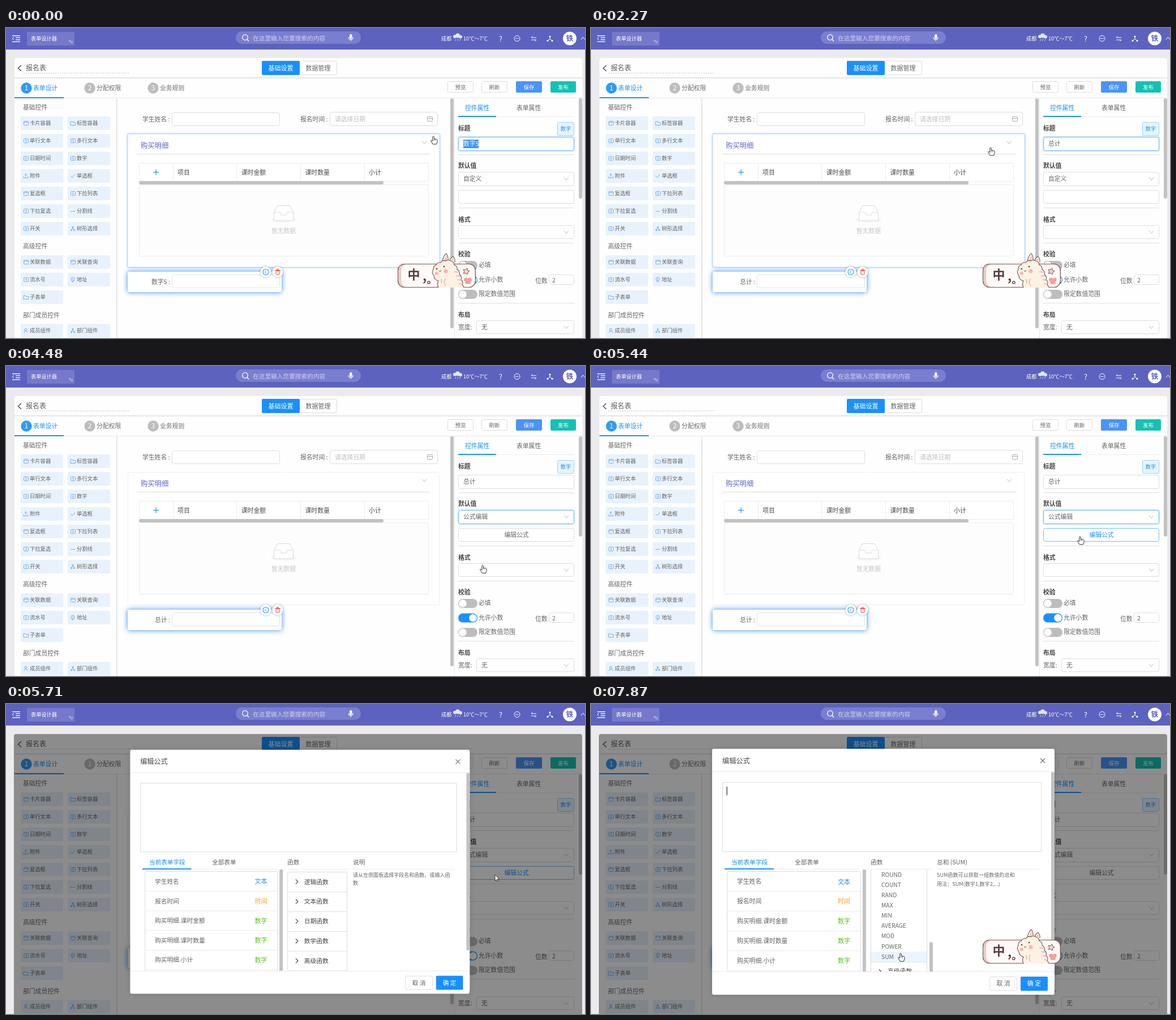
An HTML page with a canvas that plays this animation: 1023x547 px, repeating every 8000 ms.

```html
<!DOCTYPE html>
<html lang="zh">
<head>
<meta charset="utf-8">
<style>
html, body { margin: 0; width: 100%; height: 100%; overflow: hidden; background: #ebebee; }
canvas { display: block; }
</style>
</head>
<body>
<canvas id="stage" width="1023" height="547"></canvas>
<script>
const c = document.getElementById('stage').getContext('2d');
const SANS = '"Noto Sans CJK SC", "Noto Sans CJK", "Noto Sans", sans-serif';
const MONO = '"Liberation Mono", "Noto Sans CJK SC", monospace';
const BLUE = '#1890ff', INK = '#636363', LINE = '#dcdcdc', BROWN = '#755350', ICON = '#6db2f5';
const LOOP = 8000;

// ---- timeline ----
const even = (a, b, n) => Array.from({ length: n }, (_, i) => a + (b - a) * i / (n - 1));
const ticks = [0, 550, 680, 810, 940, 1190, 1440, 1710, ...even(2270, 3200, 8),
  ...even(3350, 4050, 6), ...even(4330, 5170, 7), ...even(5440, 6340, 8),
  6490, ...even(6880, 7560, 6), 7870];
const path = [[0, 755, 191], [1710, 755, 191], [2270, 706, 211], [3200, 806, 266], [3500, 806, 266],
  [4050, 838, 361], [4330, 838, 361], [5170, 862, 304], [5440, 864, 301], [5700, 864, 301],
  [6340, 547, 381], [6490, 547, 421], [6880, 547, 421], [7560, 524, 440], [7870, 547, 440]];
const typing = [[550, 'z', '在 这 中 只 做'], [680, 'zo', '走 总 作 做 左'], [810, 'zom', '总 走 宗 作 纵'],
  [940, 'zomg', '总 宗 纵 棕 综'], [1190, 'zong', '总 宗 纵 棕 综'], [1440, 'zongji', '总计 总机 总集 综计 踪迹']];

const clamp = v => Math.max(0, Math.min(1, v));
function pointer(t) {
  const i = path.findIndex(p => p[0] > t);
  if (i < 0) return path[path.length - 1].slice(1);
  const [a, b] = [path[i - 1], path[i]], k = (t - a[0]) / (b[0] - a[0]);
  return [a[1] + (b[1] - a[1]) * k, a[2] + (b[2] - a[2]) * k];
}

// ---- drawing helpers ----
function text(s, x, y, size = 11, color = INK, o = {}) {
  c.font = `${o.w || 400} ${size}px ${o.font || SANS}`;
  c.textAlign = o.align || 'left';
  c.textBaseline = 'alphabetic';
  c.fillStyle = color;
  c.fillText(s, x, y + size * .37);
}
const mid = (s, x, y, size, color, w) => text(s, x, y, size, color, { align: 'center', w });
function box(x, y, w, h, fill, stroke, r = 2) {
  c.beginPath();
  const o = stroke ? .5 : 0;
  c.roundRect(x + o, y + o, w - o * 2, h - o * 2, r);
  if (fill) { c.fillStyle = fill; c.fill(); }
  if (stroke) { c.strokeStyle = stroke; c.lineWidth = 1; c.stroke(); }
}
function line(pts, color, w = 1, close, fill) {
  c.beginPath();
  for (let i = 0; i < pts.length; i += 2) c.lineTo(pts[i], pts[i + 1]);
  if (close) c.closePath();
  if (fill) { c.fillStyle = fill; c.fill(); }
  c.strokeStyle = color; c.lineWidth = w; c.stroke();
}
const rule = (x1, x2, y, color = '#e2e2e2', h = 1) => { c.fillStyle = color; c.fillRect(x1, y, x2 - x1, h); };
function disc(x, y, r, fill, stroke, w = 1) {
  c.beginPath(); c.arc(x, y, r, 0, 7);
  if (fill) { c.fillStyle = fill; c.fill(); }
  if (stroke) { c.strokeStyle = stroke; c.lineWidth = w; c.stroke(); }
}
const chevron = (x, y, up, color = '#bbb') => {
  const d = up ? -2.5 : 2.5;
  line([x - 4, y - d, x, y + d, x + 4, y - d], color);
};
function glow(color, blur, draw) {
  c.save(); c.shadowColor = color; c.shadowBlur = blur; draw(); c.restore();
}
function clipped(x, y, w, h, draw) {
  c.save(); c.beginPath(); c.rect(x, y, w, h); c.clip(); draw(); c.restore();
}
function button(s, x, y, w, h, size, fill, stroke, color) {
  box(x, y, w, h, fill, stroke);
  mid(s, x + w / 2, y + h / 2, size, color);
}

// ---- page parts ----
function header() {
  c.fillStyle = '#5d62be'; c.fillRect(0, 0, 1023, 38);
  for (const [x, y] of [[11, 13], [17, 16.5], [17, 20], [11, 23.5]]) rule(x, 25, y, '#fff', 1.3);
  line([14, 16.5, 11, 18.7, 14, 21], '#fff');
  box(37, 7, 84, 24, '#7679ca', null, 1);
  text('表单设计器', 44, 19, 9.2, '#fff');
  box(111, 21, 3, 3, null, '#b9bbe8', 0); box(114, 23, 4, 4, null, '#b9bbe8', 0);
  box(406, 6, 221, 22, '#7a7ecf', null, 11);
  disc(422.5, 16.5, 4.8, null, '#fff', 1.3); line([426, 20, 429, 23.5], '#fff', 1.4);
  text('在这里输入您要搜索的内容', 436, 18, 10.7, '#cfd1f3');
  box(607, 11, 4.5, 8, '#fff', null, 2.2);
  c.beginPath(); c.arc(609.2, 16.5, 4, 0, Math.PI); c.strokeStyle = '#fff'; c.stroke();
  line([609.2, 20.5, 609.2, 23], '#fff');
  text('成都', 769, 18.5, 9.2, '#fff');
  for (const [x, y, r] of [[793, 15, 3], [798, 13.5, 4], [803, 15.5, 3]]) disc(x, y, r, '#dfe6f5');
  for (const x of [795, 799, 803]) line([x, 19, x - 1.5, 23], '#a9cff5');
  text('10℃～7℃', 808, 18.5, 9.2, '#fff');
  mid('?', 874, 19, 12.5, '#fff');
  disc(903, 18.5, 5, null, '#fff');
  for (const x of [901, 903, 905]) disc(x, 18.5, .8, '#fff');
  line([937, 17, 928, 17, 930.5, 14.5], '#fff'); line([928, 21, 937, 21, 934.5, 23.5], '#fff');
  line([961, 16, 961, 19, 957, 22.5], '#fff'); line([961, 19, 965, 22.5], '#fff');
  for (const [x, y] of [[961, 15], [957, 22.5], [965, 22.5]]) disc(x, y, 1.6, '#fff');
  disc(996, 18.5, 12, '#fff');
  mid('铁', 996, 18.5, 12.5, '#5d62be', 700);
  line([1016, 20.5, 1019.5, 16, 1023, 20.5], '#fff');
}

function topBars() {
  line([27, 66, 21.5, 71, 27, 76], '#444', 1.3);
  text('报名表', 35, 71, 12, '#5a5a5a');
  c.setLineDash([2, 2]); line([31, 79.5, 219, 79.5], '#c4c4c4'); c.setLineDash([]);
  button('数据管理', 518, 58, 67, 25, 11, '#fff', LINE, INK);
  button('基础设置', 452, 58, 67, 25, 11, BLUE, null, '#fff');
  rule(15, 1018, 87, '#e6e6e6', 2);
  const tabs = ['表单设计', '分配权限', '业务规则'], xs = [36, 148, 260];
  tabs.forEach((s, i) => {
    disc(xs[i], 106, 9.7, i ? '#bdbdbd' : '#2f9bf7');
    mid(i + 1, xs[i], 106, 11.5, '#fff');
    text(s, xs[i] + 12, 106, 10.8, i ? '#6a6a6a' : BLUE);
  });
  button('预览', 780, 94, 46, 20, 9.5, '#fff', LINE, INK);
  button('刷新', 840, 94, 46, 20, 9.5, '#fff', LINE, INK);
  button('保存', 901, 94, 46, 20, 9.5, '#4a93f8', null, '#fff');
  button('发布', 962, 94, 45, 20, 9.5, '#13c2b4', null, '#fff');
  rule(15, 1018, 123, '#e8e8e8');
  rule(15, 102, 122, BLUE, 2);
}

const icons = {
  card(x, y) { box(x, y - 4, 9, 8, null, ICON, 1); rule(x, x + 9, y - 2, ICON); },
  folder(x, y) { line([x, y - 3, x + 3, y - 3, x + 4, y - 1.5, x + 8.5, y - 1.5, x + 8.5, y + 3.5, x, y + 3.5], ICON, 1, true); },
  field(x, y) { box(x, y - 4, 9, 8, null, ICON, 1); mid('x', x + 4.5, y - .5, 6, '#3f9af2'); },
  check(x, y) { line([x, y, x + 3, y + 3, x + 8, y - 3], ICON); },
  dash(x, y) { rule(x, x + 8, y, ICON); },
  up(x, y) {
    line([x, y + 1, x, y + 3.5, x + 8, y + 3.5, x + 8, y + 1], ICON);
    line([x + 2, y - 1.5, x + 4, y - 4, x + 6, y - 1.5], ICON);
    line([x + 4, y - 4, x + 4, y + 1.5], ICON);
  },
  pin(x, y) { disc(x + 4, y - 1, 3.2, null, ICON); disc(x + 4, y - 1, 1, ICON); line([x + 2, y + 2, x + 4, y + 4.5, x + 6, y + 2], ICON); },
  tree(x, y) {
    box(x + 2.5, y - 4, 3, 3, null, ICON, 0);
    line([x + 1.5, y + 2, x + 4, y - 1, x + 6.5, y + 2], ICON);
    box(x, y + 1, 3, 3, null, ICON, 0); box(x + 5, y + 1, 3, 3, null, ICON, 0);
  },
  user(x, y) { disc(x + 4, y - 2, 2, null, ICON); line([x + .5, y + 4, x + 2, y + 1, x + 6, y + 1, x + 7.5, y + 4], ICON); }
};
const groups = [
  ['基础控件', 140, 167.5, '卡片容器:card 标签容器:folder 单行文本:field 多行文本:field 日期时间:field 数字:field 附件:up 单选框:check 复选框:card 下拉列表:field 下拉复选:field 分割线:dash 开关:field 树形选择:tree'],
  ['高级控件', 385, 413, '关联数据:card 关联查询:card 流水号:field 地址:pin 子表单:folder'],
  ['部门成员控件', 507, 534, '成员组件:user 部门组件:tree']];
function palette() {
  for (const [title, ty, y0, items] of groups) {
    text(title, 30, ty, 10.8, '#666');
    items.split(' ').forEach((it, i) => {
      const [s, icon] = it.split(':'), x = i % 2 ? 109 : 26, y = y0 + (i >> 1) * 31;
      box(x, Math.round(y - 12), 75, 24, '#e8f2fc', null, 1);
      icons[icon](x + 5, Math.round(y));
      text(s, x + 16, y, 9.3, INK);
    });
  }
  rule(195, 196.5, 124, '#dedede', 423);
}

function canvasArea(s) {
  text('学生姓名 :', 241, 161, 10.8);
  box(293, 149, 191, 24, '#fff', LINE, 3);
  text('报名时间 :', 520, 161, 10.8);
  box(572, 148, 191, 25, '#fff', LINE, 3);
  text('请选择日期', 581, 161, 10.8, '#bfbfbf');
  box(744, 156, 10, 9, null, '#aaa', 1); rule(744, 754, 159, '#aaa');

  if (s.hover) glow('rgba(125,180,251,.55)', 3, () => box(214, 186, 553, 237, '#fff', '#b4d3fb', 3));
  else box(215, 187, 551, 235, '#fff', '#eee', 3);
  text('购买明细', 238, 207, 12.3, '#5f64c9');
  rule(231, 750, 222, '#dadada');
  chevron(739, 202);
  box(235, 238, 512, 33, '#fff', '#ececec', 0);
  c.fillStyle = '#ececec';
  for (const x of [295, 407, 520, 633]) c.fillRect(x, 238, 1, 33);
  line([260, 254.5, 270, 254.5], BLUE, 1.2); line([265, 249.5, 265, 259.5], BLUE, 1.2);
  ['项目', '课时金额', '课时数量', '小计'].forEach((h, i) => text(h, 303 + i * 112.7, 255, 10.9, '#4a4a4a'));
  box(235, 276, 512, 127, '#fdfdfd', '#ececec', 1);
  box(235, 270, 432, 6, '#c2c2c2', null, 3);
  c.beginPath(); c.ellipse(490.5, 338, 22, 5, 0, 0, 7); c.fillStyle = '#f4f4f4'; c.fill();
  line([473.5, 325, 480, 313.5, 501, 313.5, 507.5, 325, 507.5, 340, 473.5, 340], '#d9d9d9', 1, true, '#fff');
  line([473.5, 325, 484, 325, 486, 330, 495, 330, 497, 325, 507.5, 325], '#d9d9d9');
  mid('暂无数据', 490.5, 358, 10.8, '#c6c6c6');

  glow('#2f8dfa', 9, () => box(215, 430, 272, 36, '#fff', '#a9cffb', 3));
  box(215, 430, 272, 36, '#fff', null, 3);
  text(s.title + ' :', 290, 448, 10.8, INK, { align: 'right' });
  box(293, 435, 191, 24, '#fff', '#e2e2e2', 3);
  for (const x of [459, 480]) glow('rgba(0,0,0,.3)', 4, () => disc(x, 430.5, 9.5, '#fff'));
  disc(459, 430.5, 5, null, BLUE, 1.1); mid('c', 459, 430, 7.5, BLUE);
  rule(475, 485, 427, '#f0453a', 1.2); box(476.5, 428, 7, 7.5, null, '#f0453a', 1); rule(478, 482, 425, '#f0453a', 1.2);
  box(785, 124, 6, 406, '#c2c2c2', null, 3);
}

function toggle(y, on) {
  box(799, y - 8, 34, 16, on ? BLUE : '#bdbdbd', null, 8);
  disc(on ? 825 : 807, y, 6.8, '#fff');
}

function properties(s) {
  rule(792, 793, 124, '#e6e6e6', 423);
  text('控件属性', 811, 141, 10.8, BLUE);
  text('表单属性', 902, 141, 10.8);
  rule(799, 1004, 156, '#ececec'); rule(799, 866, 155, BLUE, 2);
  for (const [t, y] of [['标题', 177], ['默认值', 243], ['格式', 338], ['校验', 399], ['布局', 506]])
    text(t, 799, y, 10.8, '#444', { w: 700 });
  button('数字', 974, 166, 30, 24, 9.2, '#e6f4ff', '#9dd0ff', BLUE);
  for (const y of [223, 317, 379, 485]) rule(799, 1004, y, '#dedede');

  const focusBox = (y, on) => on
    ? glow('rgba(105,180,255,.5)', 3, () => box(799, y, 205, 25, '#fff', '#73bcff', 3))
    : box(799, y, 205, 25, '#fff', LINE, 3);
  focusBox(192, s.q < 3350);
  if (s.q < 550) {
    c.fillStyle = '#3a94f5'; c.fillRect(808, 197, 27, 15);
    text(s.title, 808, 204.5, 10.8, '#fff');
  } else {
    text(s.title, 808, 204.5, 10.8);
    if (s.typed) {
      const w = c.measureText(s.title).width;
      rule(808, 808 + w, 211, '#555'); c.fillRect(809 + w, 197, 1, 14);
    }
  }
  focusBox(254, s.q >= 3200 && s.q < 5690);
  text(s.formula ? '公式编辑' : '自定义', 808, 266.5, 10.8);
  chevron(990, 266, s.open && !s.formula);
  const over = s.formula && s.y > 286 && s.y < 310 && s.x > 799;
  box(799, 286, 205, 24, '#fff', over ? '#73bcff' : LINE, 3);
  if (s.formula) mid('编辑公式', 902, 298.5, 10.8, over ? BLUE : INK);
  box(799, 348, 205, 24, '#fff', LINE, 3); chevron(990, 360);
  toggle(419, false); toggle(444.5, true); toggle(470, false);
  text('必填', 835, 418.5, 10.8); text('允许小数', 835, 444, 10.8); text('限定数值范围', 835, 469, 10.8);
  text('位数', 935, 446, 10.8);
  box(959, 435, 45, 18, '#fff', LINE, 3); text('2', 965, 445, 10.5);
  text('宽度:', 799, 528.5, 10.8);
  box(831, 516, 173, 24, '#fff', LINE, 3); text('无', 840, 528.5, 10.8); chevron(990, 528);
  box(1012, 124, 6, 177, '#c2c2c2', null, 3);
  if (s.open) dropdown(s);
}

function dropdown(s) {
  const part = s.q < 3400 || s.formula;
  c.save();
  if (part) { c.globalAlpha = .5; c.translate(0, 280 * .15); c.scale(1, .85); }
  glow('rgba(0,0,0,.25)', 5, () => box(799, 281, 205, 97, '#fff', null, 2));
  ['自定义', '数据联动', '关联第三方数据源', '公式编辑'].forEach((t, i) => {
    const y = 294 + i * 24, over = Math.abs(s.y + 4 - y) < 12;
    if (!i || over) { c.fillStyle = i ? '#f4f4f4' : '#e6f5ff'; c.fillRect(799, y - 12, 205, 24); }
    text(t, 808, y + .5, 10.8, i ? INK : '#444', { w: i ? 400 : 700 });
  });
  c.restore();
}

// ---- formula dialog ----
const ROW = 35.2, SUB = 18.15;
const fields = [['学生姓名', '文本', BLUE], ['报名时间', '时间', '#fa9a14'], ['购买明细.课时金额', '数字', '#52c41a'],
  ['购买明细.课时数量', '数字', '#52c41a'], ['购买明细.小计', '数字', '#52c41a'], ['', '', BLUE]];
const kinds = ['逻辑函数', '文本函数', '日期函数', '数学函数', '高级函数'];
const maths = 'ABS CEILING FLOOR INT LOG ROUND COUNT RAND MAX MIN AVERAGE MOD POWER SUM'.split(' ');

function functions(s) {
  const wide = s.q >= 6870, scroll = 236 * clamp((s.q - 7000) / 500), right = wide ? 593 : 600;
  clipped(490, 292, 118, 180, () => {
    c.save();
    c.translate(0, -scroll);
    box(494, 296, right - 493, 5 * ROW + (wide ? maths.length * SUB : 0), '#fff', LINE, 2);
    kinds.forEach((k, i) => {
      const top = 296 + i * ROW + (wide && i > 3 ? maths.length * SUB : 0), y = top + ROW / 2;
      if (i) rule(494, right, top, '#e0e0e0');
      if (wide && i === 3) line([507, y - 2, 511, y + 2, 515, y - 2], '#444', 1.2);
      else line([509, y - 4, 513, y, 509, y + 4], '#444', 1.2);
      text(k, 524, y, 10.8, '#444');
    });
    if (wide) {
      const on = Math.round((s.y + scroll - 446) / SUB);
      maths.forEach((m, i) => {
        const y = 446 + i * SUB;
        if (i === on) { c.fillStyle = '#e9f6ff'; c.fillRect(495, y - 9, 98, 18); }
        text(m, 513, y, 10.3, '#666');
      });
    }
    c.restore();
    if (wide) box(598, 296 + scroll * 124 / 236, 6, 72, '#c2c2c2', null, 3);
  });
}

function describe(s) {
  const [head, a, b] = s.q >= 7870 ? ['总和 (SUM)', 'SUM函数可以获取一组数值的总和', '用法：SUM(数字1,数字2,...)']
    : s.q >= 7550 ? ['乘幂 (POWER)', 'POWER函数可以获取数字乘幂', '用法：POWER(数字,幂)']
    : ['说明', '请从左侧面板选择字段名和函数，或输入函', '数'];
  text(head, 611, 279, 10.7);
  text(a, 611, 302, 9.1, '#666');
  text(b, 611, s.q < 7550 ? 315.5 : 318, 9.1, '#666');
}

function dialog(s) {
  const p = clamp((s.q - 5440) / 300);
  if (p <= 0) return;
  box(14, 53, 1004, 500, `rgba(0,0,0,${.45 * clamp(p * 1.3)})`, null, 4);
  const k = .2 + .8 * Math.sqrt(1 - (1 - p) ** 2);
  c.save();
  c.globalAlpha = clamp(p * 1.3);
  c.translate(865, 307); c.scale(k, k); c.translate(-865, -307);
  glow('rgba(0,0,0,.15)', 8, () => box(214, 79, 605, 434, '#fff', null, 3));
  text('编辑公式', 232, 100, 12.2, '#444');
  line([794, 96, 802, 104], '#777', 1.2); line([802, 96, 794, 104], '#777', 1.2);
  rule(214, 819, 119, '#e8e8e8');
  box(232, 138, 564, 123, '#fff', '#dadada', 0);
  if (s.q >= 6870) { c.fillStyle = '#333'; c.fillRect(239.5, 146, 1.3, 15); }
  box(813, 120, 6, 316, '#c2c2c2', null, 3);
  text('当前表单字段', 248, 279, 10.7, BLUE);
  text('全部表单', 360, 279, 10.7);
  text('函数', 494, 279, 10.7);
  rule(236, 476, 291, '#ebebeb'); rule(494, 603, 291, '#ebebeb'); rule(611, 792, 291, '#ebebeb');
  rule(236, 323, 290, BLUE, 2);
  clipped(236, 292, 254, 180, () => {
    box(240, 295, 237, 220, '#fff', LINE, 2);
    fields.forEach(([name, type, color], i) => {
      const y = 313 + i * 34.8;
      if (i) rule(240, 476, Math.round(y - 17.5), '#ebebeb');
      text(name, 258, y + .5, 10.8);
      text(type, 436, y + .5, 11, color);
    });
    box(480, 291, 6, 200, '#c2c2c2', null, 3);
  });
  functions(s);
  describe(s);
  rule(214, 819, 472, '#e8e8e8');
  button('取 消', 704, 481, 49, 25, 10.8, '#fff', LINE, INK);
  button('确 定', 759, 481, 48, 25, 10.8, BLUE, null, '#fff');
  c.restore();
}

// ---- input method ----
const wool = [[12, 4], [8, -12], [0, -21], [-1, -32], [4, -40], [12, -44], [21, -47], [30, -47],
  [36, -40], [41, -32], [45, -23], [48, -14], [50, -5], [52, 4]];
function ear(x, y, tipX, tipY) {
  c.beginPath();
  c.moveTo(x - 5, y);
  c.quadraticCurveTo(x - 4, tipY + 4, tipX, tipY);
  c.quadraticCurveTo(x + 6, tipY + 5, x + 5, y);
  c.fillStyle = '#fdf1e4'; c.fill();
  c.strokeStyle = BROWN; c.lineWidth = 1.1; c.stroke();
  line([x - 1, y - 3, tipX, tipY + 4, x + 2, y - 3], '#f3b9ac', 1, true, '#f3b9ac');
}
function pet(x, y, k) {
  c.save();
  c.beginPath(); c.rect(x - 20, y - 90, 110, 90); c.clip();
  c.translate(x, y); c.scale(k, k);
  ear(32, -45, 34, -55); ear(20, -45, 22, -60);
  // each tuft bulges outwards between two anchors
  c.beginPath(); c.moveTo(...wool[0]);
  for (let i = 1; i < wool.length; i++) {
    const [ax, ay] = wool[i - 1], [bx, by] = wool[i];
    c.quadraticCurveTo((ax + bx) / 2 + (by - ay) * .4, (ay + by) / 2 - (bx - ax) * .4, bx, by);
  }
  c.fillStyle = '#fdf1e4'; c.fill();
  c.strokeStyle = BROWN; c.lineWidth = 1.1; c.stroke();
  for (const [a, b] of [[36, -28], [39, -21], [42, -14], [44, -7]]) line([a, b, a + 7, b + 1], '#c79c8d', 1.2);
  disc(5, -25, 3, '#f8b7ad'); disc(21, -29, 3.6, '#f8b7ad');
  disc(5, -33, 1.3, '#4a3533'); disc(18, -37, 1.3, '#4a3533');
  line([9, -30, 11, -28, 13, -31], BROWN);
  line([20, -16, 18, -9, 21, -3], '#c79c8d'); line([13, -15, 14, -7], '#c79c8d');
  c.restore();
}
function star(x, y, r) {
  const pts = [];
  for (let i = 0; i < 10; i++) {
    const a = i * Math.PI / 5 - 1.3, d = i % 2 ? r * .55 : r;
    pts.push(x + d * Math.cos(a), y + d * Math.sin(a));
  }
  line(pts, BROWN, 1, true, '#f7cfc4');
}
function pill(x, y, w, h, r) {
  box(x, y, w, h, '#e8c8c2', BROWN, r);
  box(x + 6, y + 1, w - 8, h - 2, '#fffaf8', null, r);
  box(x, y, w, h, null, BROWN, r);
}
function imeBar() {
  pill(692, 416, 138, 42, 11);
  mid('中', 720.5, 435, 22, '#5b3d3b', 700);
  text(',', 736, 438, 22, '#5b3d3b', { w: 700 });
  disc(747, 449, 2.2, null, '#5b3d3b', 1.3);
  pet(756, 458, 1);
  star(813, 429.5, 6);
  line([810, 442, 814, 441, 816, 443, 818, 441, 822, 442, 822, 446, 820, 446, 820, 451, 812, 451, 812, 446, 810, 446], '#f58d86', 1, true, '#f7a09a');
}
function imePopup([, s, list]) {
  const long = s === 'zongji', w = long ? 386 : 326, gap = long ? 46 : 33.8;
  pill(632, 235, w, 57, 13);
  text(s, 652, 255, 11, '#4a3533', { font: MONO, w: 700 });
  c.fillStyle = '#e8473f'; c.fillRect(653 + c.measureText(s).width, 248, 1, 13);
  list.split(' ').forEach((t, i) => text(`${i + 1}.${t}`, 652 + i * gap, 274, 11, i ? '#5b4a48' : '#ee5a52', { font: MONO }));
  const x = 652 + gap * 5;
  line([x + 4, 270, x, 274, x + 4, 278], '#bbb', 1, true, '#ccc');
  line([x + 9, 270, x + 13, 274, x + 9, 278], '#444', 1, true, '#444');
  box(x + 17, 269, 9, 9, null, '#888', 0);
  line([x + 19, 273, x + 24, 273, x + 21.5, 276], '#444', .5, true, '#444');
  pet(632 + w - 92, 292, 1.37);
  star(632 + w - 14, 250, 7);
}

function cursor(s) {
  c.save();
  c.translate(s.x, s.y);
  if (s.q > 5500 && s.q < 6330) {
    line([0, 0, 0, 11, 2.5, 8.7, 4.2, 12.3, 5.8, 11.5, 4.3, 8, 7.5, 8], '#222', .9, true, '#fff');
  } else {
    line([-1.2, 1, 0, -.3, 1.3, 1, 1.3, 5, 3.5, 4.8, 5.5, 5.4, 7, 6.4, 7, 10, 5.6, 14, -.8, 14,
      -2.6, 11, -4.5, 7.6, -3.5, 6.6, -1.2, 8.6], '#333', 1, true, '#fff');
    line([1.3, 5, 1.3, 8], '#555', .7); line([3.5, 5, 3.5, 8], '#555', .7);
  }
  c.restore();
}

function draw(t) {
  const q = ticks.filter(k => k <= t).pop();
  const [x, y] = pointer(q);
  const typed = q < 1700 && typing.filter(k => k[0] <= q).pop();
  const s = {
    q, x, y, typed,
    title: q < 550 ? '数字5' : typed ? typed[1] : '总计',
    hover: q < 3200 && x < 767,
    open: q >= 3350 && q < 4400,
    formula: q >= 4330
  };
  c.fillStyle = '#ebebee'; c.fillRect(0, 0, 1023, 547);
  header();
  box(15, 53, 1003, 500, '#fefefe', null, 4);
  topBars();
  palette();
  canvasArea(s);
  properties(s);
  dialog(s);
  if (q < 3200 || q > 7000) imeBar();
  if (typed) imePopup(typed);
  cursor(s);
}

function frame() {
  draw(performance.now() % LOOP);
  requestAnimationFrame(frame);
}
frame();
</script>
</body>
</html>
```
